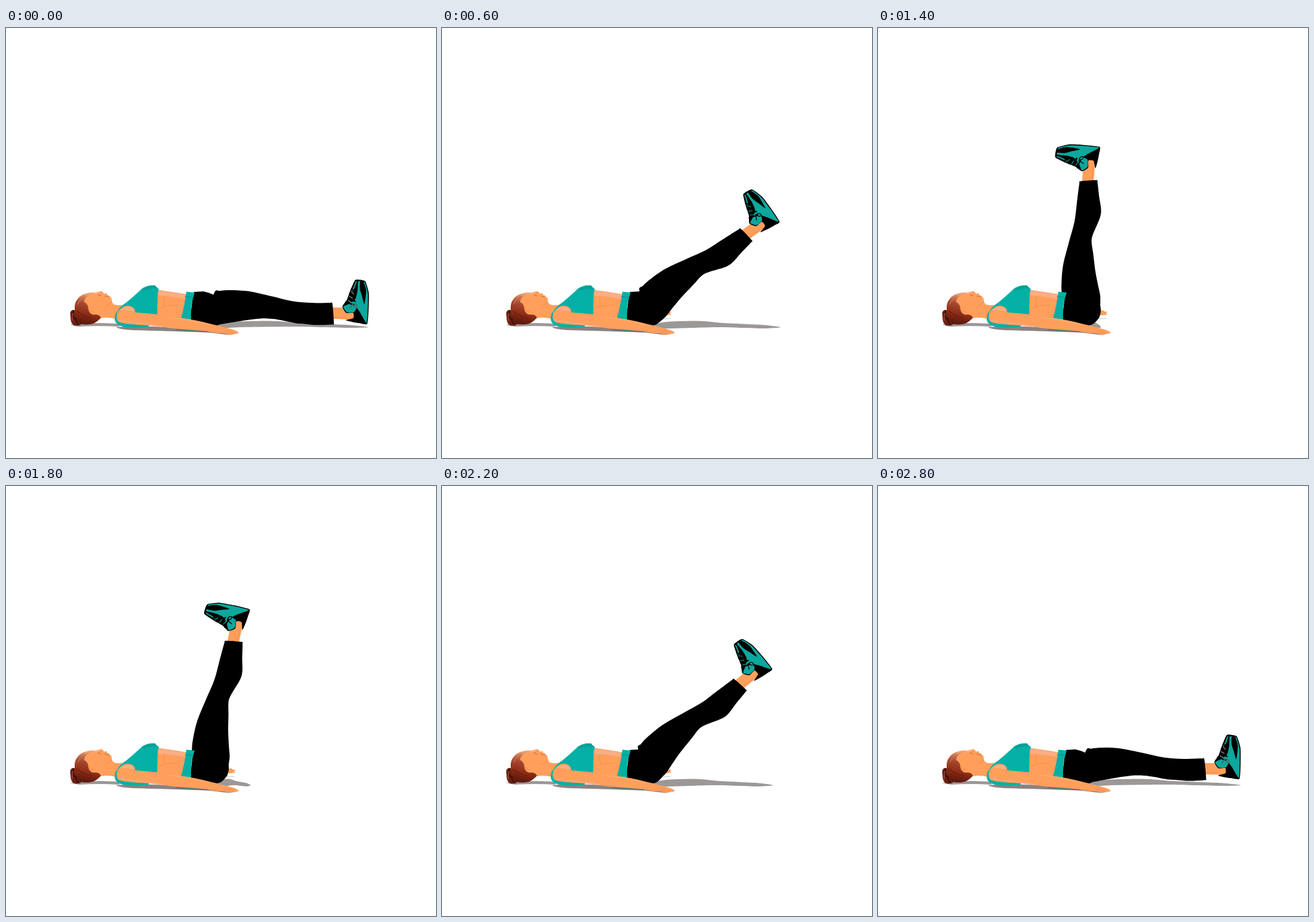
Recreate the animation shown at these times as an HTML page with a canvas. Size 720 by 720 pixels, loop 3000 ms.

```html
<!DOCTYPE html>
<html lang="en">
<head>
<meta charset="utf-8">
<title>Lying leg raise</title>
<style>
html, body { margin: 0; width: 100%; height: 100%; overflow: hidden; background: #fff; }
canvas { display: block; width: 720px; height: 720px; }
</style>
</head>
<body>
<canvas id="stage" width="720" height="720"></canvas>
<script>
const ctx = document.getElementById('stage').getContext('2d');

const SKIN = '#ff9f5b', LIGHT = '#f9ae86', SHADE = '#ee8a4c';
const TEAL = '#04b0a5', SHOE = '#0ca79d', BLACK = '#000', SHADOW = '#9b9897';
const HIP = { x: 335, y: 468 };
const STEP = 200, LOOP = 3000;

// Leg angle in degrees for each 200 ms step; the top position is held for two.
const ANGLES = [-2.7, 2.5, 17.4, 35, 52.4, 68.7, 80.5, 85.4, 85.4, 77.5, 60.5, 39.6, 18.5, 10, -1.6];

function shape(d, fill) {
  ctx.fillStyle = fill;
  ctx.fill(new Path2D(d));
}

function line(d, color, width) {
  ctx.strokeStyle = color;
  ctx.lineWidth = width;
  ctx.lineCap = ctx.lineJoin = 'round';
  ctx.stroke(new Path2D(d));
}

// Closed curve through all points.
function blob(points, fill, bend = 1) {
  const n = points.length, at = i => points[(i + n) % n], k = bend / 6;
  ctx.beginPath();
  ctx.moveTo(...points[0]);
  for (let i = 0; i < n; i++) {
    const [a, b, c, d] = [at(i - 1), at(i), at(i + 1), at(i + 2)];
    ctx.bezierCurveTo(
      b[0] + (c[0] - a[0]) * k, b[1] + (c[1] - a[1]) * k,
      c[0] - (d[0] - b[0]) * k, c[1] - (d[1] - b[1]) * k, c[0], c[1]);
  }
  ctx.fillStyle = fill;
  ctx.fill();
}

function gradient(x0, y0, x1, y1, ...colors) {
  const g = ctx.createLinearGradient(x0, y0, x1, y1);
  colors.forEach((c, i) => g.addColorStop(i / (colors.length - 1), c));
  return g;
}

function drawShadows(angle) {
  const heel = HIP.x + 270.5 * Math.cos((angle - 2.84) * Math.PI / 180) + 3;
  const low = Math.max(0, 1 - Math.max(0, angle) / 20);
  const x = f => 355 + (heel - 355) * f;
  blob([[x(0), 497], [x(.1), 492], [x(.35), 490.5], [x(.55), 494], [x(.74), 496],
    [x(.88), 497.5], [x(1), 501], [x(.88), 503 - low], [x(.7), 502 - low],
    [x(.5), 501 - low], [x(.15), 503 - 2 * low], [x(0), 503]], SHADOW, .8);
  shape('M107 497 Q125 494 160 494 L190 495 L190 500 Q155 498 122 500 Z', SHADOW);
  shape('M184 501 Q215 498 250 500 L340 505 L390 511 L374 514 L340 510 Q260 507 215 506 Q190 505 184 501Z', '#8b8280');
}

function drawShoe(low) {
  blob([[255, 58.5], [264.5, 56], [271, 37], [272, 12], [271, -14.4], [260, -14.5],
    [248, -13.2], [234.6, -10.3], [247, -6.2], [246.6, 2.7], [234.7, 2],
    [228, 12.3], [235, 24], [239.7, 39.3], [247, 57.5]], BLACK, .55);
  blob([[257, 56], [264, 54], [269.5, 36], [270.5, 12], [270, -13], [265.5, -8],
    [258, 4], [252, 11], [248, 4], [236, 3], [229.5, 12], [240, 18],
    [249, 26], [252, 40], [252, 55]], SHOE, .5);
  blob([[256, 57], [262, 54], [266.5, 40], [264.5, 18], [260, 31], [256, 43]], BLACK, .7);
  blob([[247, 55], [252, 53], [251, 40], [246, 28], [241, 39]], BLACK, .6);
  line('M249 55 L246 45 L243 40', SHOE, 2);
  // Lacing
  line('M242 43 L250 36 M239 35 L249 29 M237 27 L249 22 M233 20 L247 16 M247 34 L239 28 M247 24 L236 18', BLACK, 2.2);
  line('M242 38 L246 34 M239 30 L244 27 M237 23 L242 20', low ? '#9ba7a5' : SHOE, 1.1);
  line('M245 18 Q254 18 252 11 Q247 12 245 18 M245 18 L241 10', low ? '#52605f' : BLACK, 1.4);
}

function drawLeg(angle) {
  const raise = Math.min(1, Math.max(0, angle / 35));
  const back = .79 + .21 * raise;
  const cuff = 3 * (1 - raise);

  ctx.save();
  ctx.translate(HIP.x, HIP.y);
  ctx.rotate(-angle * Math.PI / 180);
  ctx.scale(1, -1);
  shape('M207 10 L230 10.5 L248 4 L250 -8 L236 -9 L207 -9 Z', SKIN);
  line('M217 -6 L235 -6', SHADE, 1);
  drawShoe(angle < 3);
  blob([[12, 24], [22, 29], [40, 31], [70, 30.5], [108, 24], [143, 17.5], [176, 16],
    [207, 14.5 + cuff], [211, 13 + cuff], [215, -13 - cuff], [212, -15.5 - cuff],
    [187, -20.5], [168, -25 * back], [153, -24.5 * back], [124, -15], [111, -13.8],
    [92, -18 * back], [63, -24 * back], [41, -30 * back], [18, -36 * back], [0, -30]], BLACK, .95);
  ctx.restore();

  // Pelvis stays on the floor while the thigh turns.
  const r = raise * 8;
  shape(`M314 442 L331 441 Q${352 + r} 446 ${362 + r} 457 Q${368 + r} 472 ${364 + r * .8} 485 Q361 498 353 498 L338 496 L308 488 Z`, BLACK);
}

function drawHead() {
  shape('M112 472 Q106 473 108 484 Q108 495 114 498 Q123 500 128 494 L132 475 Z', '#6d2012');
  line('M113 474 Q110 482 115 487 M120 481 Q114 491 121 496', '#3d120b', 2.5);
  line('M112 478 Q110 484 111 490', '#a34b32', 1.5);
  shape('M117 464 Q118 449 132 445 Q142 442 150 443 Q156 441 160 440.5 L163 443 L164 445 Q168 443 169 445 L169 447 Q173 447 173 449 Q177 451 177 455 Q177 460 181 463 Q192 466 201 462 L194 489 L179 486 Q168 484 158 486 L140 491 Z', SKIN);
  shape('M129 449 Q139 443 151 443 L160 441 L153 446 Q140 445 130 451Z', LIGHT);
  shape('M115 470 Q114 455 128 447 Q137 443 148 444 Q131 449 131 459 Q138 462 138 472 Q140 479 147 480 Q156 479 159 485 Q153 492 146 495 Q134 498 124 495 Q115 488 115 470Z',
    gradient(138, 446, 128, 493, '#eaa078', '#a94830', '#8f2e18', '#5f180c'));
  line('M119 474 Q129 483 143 485 M120 481 Q130 490 148 489', '#73200f', 1.8);
  line('M120 462 Q125 454 132 450', '#bd6c4d', 1.6);
  line('M138 469 Q141 475 146 475', SHADE, 1.5);
  line('M154 446 L159 449 M166 449 L172 450', '#c66e45', 1.1);
  line('M176 459 Q173 464 166 466', SHADE, 1);
}

function drawTorso() {
  shape('M250 438 Q280 442 304 446 L300 492 L248 492 Z', SKIN);
  shape('M255 440 Q280 443 302 446 L301 454 Q278 449 255 448 Z', LIGHT);
  line('M256 469 Q270 464 287 464 M264 451 Q264 460 266 465', '#f58f52', 1.2);
  shape('M302 441.5 L316 443 Q308 464 310 488 L293 486 Q299 465 302 441.5Z', TEAL);
  line('M300 450 L312 451', '#078f87', 1);
  shape('M187 474 Q191 466 201 460 Q219 445 228 436 Q237 430 250 431 L251 433 L256 437 L254 444 L253 482 L238 500 Q206 503 190 498 Q182 494 182 487 Q182 480 187 474Z', TEAL);
  shape('M229 437 Q240 431 250 432 L254 437 Q242 434 231 440Z', '#0a9d94');
  shape('M184 482 Q188 471 198 466 Q207 463 213 468 Q217 472 216 476 L226 477 Q256 479 283 484 Q316 488 345 496 Q362 500 373 503 L383 506 L391 510 L386 510 L389 512 L381 512 L374 514 Q365 510 354 511 L338 508 Q310 505 279 503 Q259 500 240 498 L204 496 Q190 495 186 489 Z', SKIN);
  shape('M190 473 Q200 464 211 468 Q217 472 214 475 Q204 471 190 473Z', LIGHT);
  line('M188 490 Q215 493 236 496 L265 500', '#f3aa83', 2);
  line('M270 484 Q305 488 340 497', '#fab083', 1.2);
  line('M367 506 L382 510 M365 508 L377 512', SHADE, 1);
  line('M185 478 Q182 486 188 494', TEAL, 2.5);
  shape('M187 492 Q203 497 239 498 L238 501 Q208 503 192 499 Z', TEAL);
  line('M285 505 L337 508.5', '#24726c', 1);
}

function render(now) {
  const angle = ANGLES[Math.floor(now % LOOP / STEP)];
  ctx.fillStyle = '#fff';
  ctx.fillRect(0, 0, 720, 720);
  drawShadows(angle);
  shape('M370 473 L378 473 L380 475 L384 475 L382 478 L384 480 L376 481 L368 481 Z', SKIN);
  line('M370 487 L382 486.5', '#c8c5c4', 1);
  drawLeg(angle);
  drawHead();
  drawTorso();
}

const start = performance.now();
function tick() {
  render(performance.now() - start);
  requestAnimationFrame(tick);
}
tick();
</script>
</body>
</html>
```
